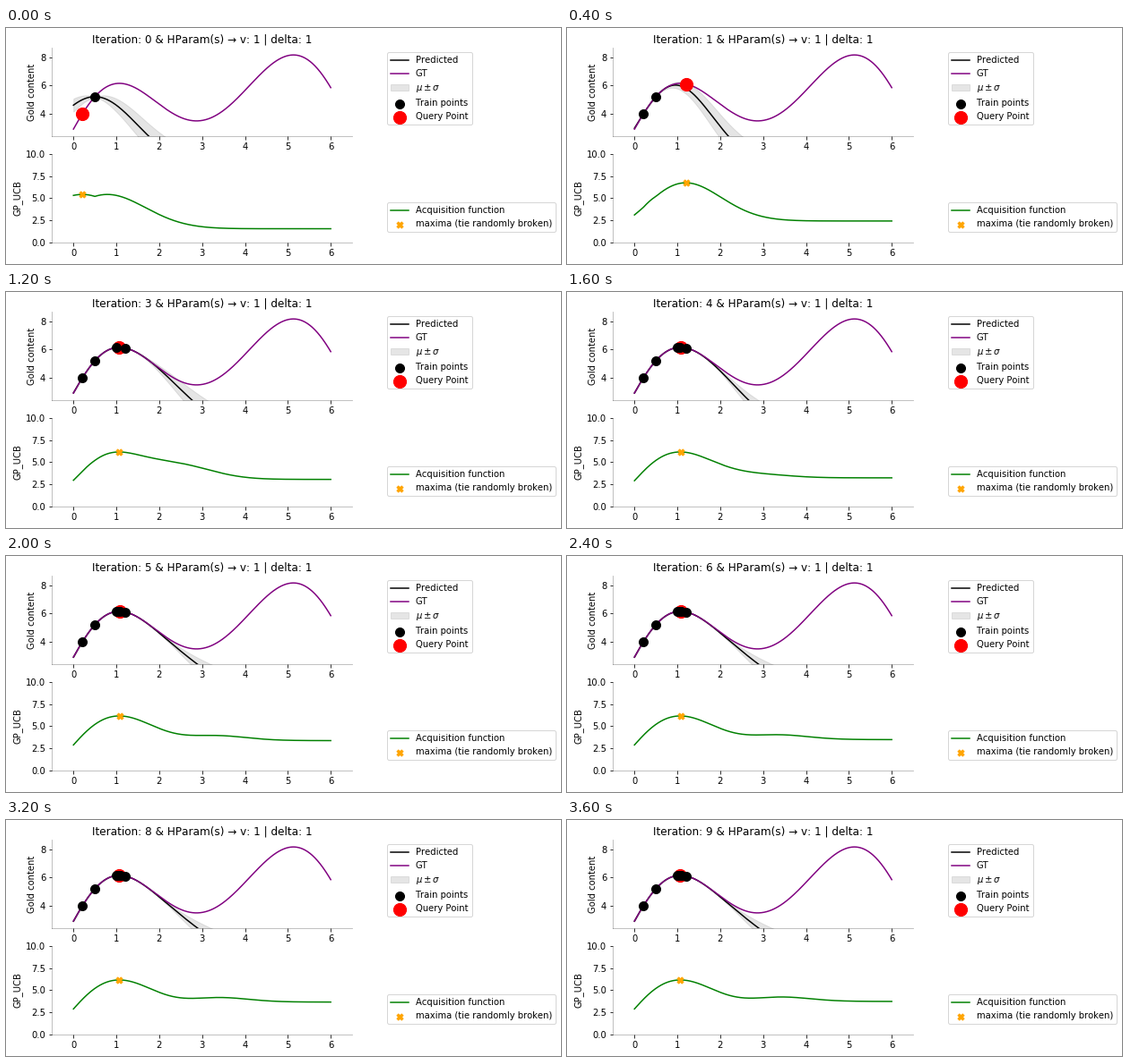
Write a matplotlib script that moves like this. It is 619 px wide and 264 px high and loops after 4 s.

```python
import matplotlib.pyplot as plt
import numpy as np
from matplotlib.animation import FuncAnimation

W, H, DPI = 619, 264, 72
AX_X, AX_W, AX_H = 51.3, 334.8, 98.836
BOTTOM, PITCH = 24.2, 118.604
STEPS, INTERVAL = 10, 400
START = 0.5
QUERIES = [0.21, 1.2, 1.0, 1.07, 1.085, 1.085, 1.08, 1.07, 1.065, 1.065]
JITTER = 1e-12

plt.rcParams.update({"font.family": "DejaVu Sans", "text.kerning_factor": 6})


def fit_truth():
    """Polynomial through the end values and the three turning points."""
    ends = [(0, 2.87), (6, 5.85)]
    turns = [(1.07, 6.16), (2.87, 3.46), (5.13, 8.2)]
    n = np.arange(8)
    rows = [float(x) ** n for x, _ in ends + turns]
    rows += [n * float(x) ** np.maximum(n - 1, 0) for x, _ in turns]
    vals = [y for _, y in ends + turns] + [0] * len(turns)
    return np.polynomial.Polynomial(np.linalg.solve(np.array(rows), np.array(vals)))


truth = fit_truth()


def kernel(a, b):
    return np.exp(-0.5 * (a[:, None] - b[None, :]) ** 2)


def posterior(train, x):
    """Mean and deviation of a unit RBF Gaussian process."""
    low = np.linalg.cholesky(kernel(train, train) + JITTER * np.eye(len(train)))
    v = np.linalg.solve(low, kernel(train, x))
    mean = v.T @ np.linalg.solve(low, truth(train))
    return mean, np.sqrt(np.maximum(1 - (v ** 2).sum(axis=0), 0))


def explore_weight(t):
    return np.sqrt(2 * np.log(t ** 2.5 * np.pi ** 2 / 3))


def add_axes(bottom, ylim, yticks, label):
    ax = fig.add_axes([AX_X / W, bottom / H, AX_W / W, AX_H / H])
    ax.set(xlim=(-0.5, 6.5), ylim=ylim, xticks=range(7), yticks=yticks, ylabel=label)
    for side, alpha in dict(top=0, right=0, left=0.3, bottom=0.3).items():
        ax.spines[side].set_alpha(alpha)
    return ax


fig = plt.figure(figsize=((W + 0.001) / DPI, (H + 0.001) / DPI), dpi=DPI, facecolor="white")
top = add_axes(BOTTOM + PITCH, (2.35, 8.7), [4, 6, 8], "Gold content")
low_ax = add_axes(BOTTOM, (0, 10), [0, 2.5, 5, 7.5, 10], "GP_UCB")

xs = np.linspace(0, 6, 601)
pred, = top.plot(xs, truth(xs), color="black", label="Predicted")
top.plot(xs, truth(xs), color="purple", label="GT")
band = top.fill_between(xs, truth(xs), truth(xs), color="grey", alpha=0.2,
                        label=r"$\mu \pm \sigma$")
known = top.scatter([START], [truth(START)], s=100, color="black", zorder=10,
                    label="Train points")
query = top.scatter([START], [truth(START)], s=200, color="red", zorder=5,
                    label="Query Point")
top.legend(loc="upper left", bbox_to_anchor=(1.1, 1))

acq, = low_ax.plot(xs, 0 * xs, color="green", label="Acquisition function")
best = low_ax.scatter([0], [0], s=50, marker="X", color="orange", zorder=10,
                      label="maxima (tie randomly broken)")
low_ax.legend(loc="upper left", bbox_to_anchor=(1.1, 0.5))


def update(i):
    train = np.array([START] + QUERIES[:i])
    q = QUERIES[i]
    beta = explore_weight(i + 1)

    mean, dev = posterior(train, xs)
    pred.set_ydata(mean)
    band.set_verts([np.column_stack([np.r_[xs, xs[::-1]],
                                     np.r_[mean - dev, (mean + dev)[::-1]]])])
    known.set_offsets(np.column_stack([train, truth(train)]))
    query.set_offsets([[q, truth(q)]])

    acq.set_ydata(mean + beta * dev)
    m, d = posterior(train, np.array([q]))
    best.set_offsets([[q, m[0] + beta * d[0]]])
    top.set_title(f"Iteration: {i} & HParam(s) \u2192 v: 1 | delta: 1")
    return pred, band, known, query, acq, best


anim = FuncAnimation(fig, update, frames=STEPS, interval=INTERVAL,
                     repeat=True, repeat_delay=0, blit=False)
plt.show()
```
